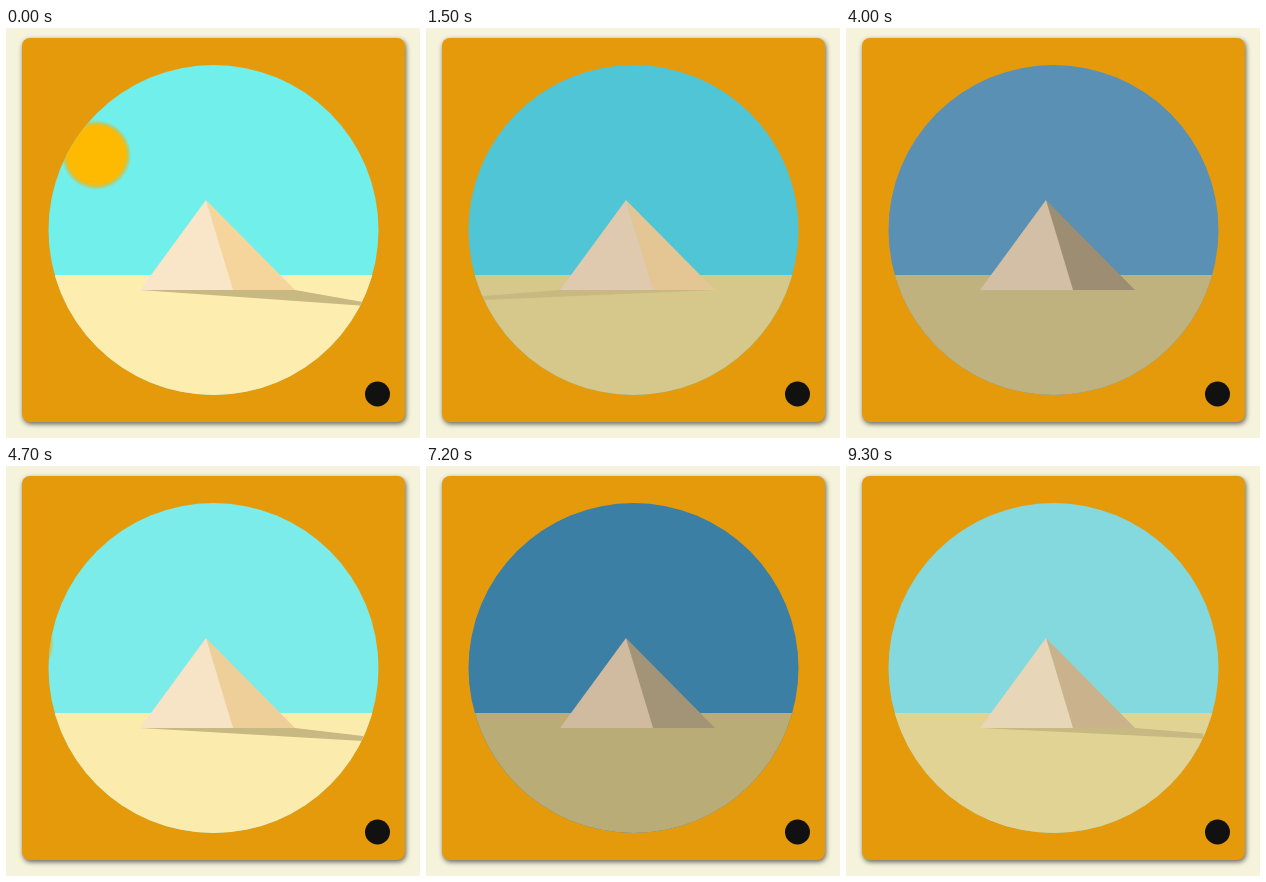
An HTML page that plays this animation: 414 px wide and 410 px high, repeating every 9.4 s.

```html
<!DOCTYPE html>
<html lang="en">
<head>
<meta charset="utf-8">
<title>Desert day and night</title>
<style>
  html, body { margin: 0; width: 100%; height: 100%; overflow: hidden; background: #f5f3dc; }
  .card {
    position: absolute; left: 16px; top: 10px; width: 383px; height: 384px;
    border-radius: 8px; background: #e59a0b; box-shadow: 1px 2px 5px rgba(0, 0, 0, .6);
  }
  svg { position: absolute; left: 0; top: 0; display: block; }
</style>
</head>
<body>
<div class="card"></div>
<svg width="414" height="410" viewBox="0 0 414 410">
  <defs>
    <clipPath id="porthole"><circle cx="207.5" cy="202" r="165"/></clipPath>
    <clipPath id="floor"><rect x="57" y="262" width="300" height="18"/></clipPath>
    <radialGradient id="sunGlow">
      <stop offset=".83" stop-color="#fdba00"/>
      <stop offset=".9" stop-color="#e8b61c" stop-opacity=".7"/>
      <stop offset="1" stop-color="#e0b030" stop-opacity="0"/>
    </radialGradient>
    <radialGradient id="starGlow">
      <stop offset="0" stop-color="#fff000"/>
      <stop offset=".25" stop-color="#e6d416" stop-opacity=".85"/>
      <stop offset=".6" stop-color="#c8ba20" stop-opacity=".4"/>
      <stop offset="1" stop-color="#c8ba20" stop-opacity="0"/>
    </radialGradient>
  </defs>
  <g clip-path="url(#porthole)">
    <rect id="sky" x="42" y="36" width="332" height="332"/>
    <circle id="sun" cx="200" cy="104" r="35" fill="url(#sunGlow)"/>
    <g id="moon">
      <path d="M268 87A28 28 0 1 0 291 137A27.7 27.7 0 0 1 268 87Z" fill="#fff000"/>
      <circle cx="283" cy="98" r="11" fill="url(#starGlow)"/>
      <circle cx="300" cy="119" r="11" fill="url(#starGlow)"/>
    </g>
    <rect id="sand" x="42" y="247" width="332" height="121"/>
    <g clip-path="url(#floor)"><path id="shadow" fill="#c8b982"/></g>
    <path id="right" d="M200 172L289 262H226Z"/>
    <path id="left" d="M200 172L227 262H134Z"/>
  </g>
  <circle cx="371.5" cy="366" r="12.5" fill="#111"/>
</svg>
<script>
  const LOOP = 9400, DAY = 5000, STEP = 100;
  const $ = id => document.getElementById(id);

  // phase in ms: sky, sand, left face, right face
  const tints = [
    [0, '70efeb', 'fdeeb0', 'f9e5c8', 'f5d59c'],
    [800, '5aeeea', 'efe0a2', 'f1e0c3', 'f5d59c'],
    [1500, '4fc5d5', 'd6c78b', 'dfcab0', 'e3c694'],
    [2200, '3b7fa5', 'b9ac76', 'd0bba0', 'a39478'],
    [3300, '283b7c', '968b5b', 'b2a48b', '695f5c'],
    [3700, '2e4683', '9c9160', 'b8aa90', '706663'],
    [4000, '5a90b4', 'c0b27f', 'd3bfa6', '9d8d72'],
    [4300, '84d9de', 'e0d394', 'e7d7b8', 'c9b28c'],
    [4600, '7eebe8', 'faebad', 'f6e2c4', 'eccd98'],
    [5000, '70efeb', 'fdeeb0', 'f9e5c8', 'f5d59c']
  ];
  // ms relative to morning: degrees along the arc, shadow tip x, shadow height
  const arc = [[-1000, -75], [-700, -60], [-300, -43], [0, -23.6], [800, 0], [1200, 15], [1500, 50], [1800, 75]];
  const tip = [[-1000, 550], [-700, 510], [0, 390], [800, 192], [1500, -60], [1800, -170]];
  const height = [[-1000, 0], [-700, 18], [0, 18], [800, 15.5], [1500, 15], [1800, 0]];

  const mix = (a, b, k) => a + (b - a) * k;

  function locate(keys, t) {
    let i = 1;
    while (i < keys.length - 1 && t > keys[i][0]) i++;
    const [a, b] = [keys[i - 1], keys[i]];
    const k = (t - a[0]) / (b[0] - a[0]);
    return [a, b, Math.min(1, Math.max(0, k))];
  }

  function value(keys, t) {
    const [a, b, k] = locate(keys, t);
    return mix(a[1], b[1], k);
  }

  function blend(a, b, k) {
    const part = (hex, i) => parseInt(hex.substr(i, 2), 16);
    return `rgb(${[0, 2, 4].map(i => Math.round(mix(part(a, i), part(b, i), k)))})`;
  }

  // wraps a phase so the time before sunrise becomes negative
  const wrap = t => (t + 1500 + DAY) % DAY - 1500;

  const turn = (id, deg) => $(id).setAttribute('transform', `rotate(${deg} 200 378)`);

  function draw(ms) {
    const phase = Math.floor(ms % LOOP / STEP) * STEP % DAY;
    const [a, b, k] = locate(tints, phase);
    ['sky', 'sand', 'left', 'right'].forEach((id, i) =>
      $(id).setAttribute('fill', blend(a[i + 1], b[i + 1], k)));

    const day = wrap(phase), night = wrap(phase - DAY / 2);
    turn('sun', value(arc, day));
    turn('moon', value(arc, night) - 15);
    $('shadow').setAttribute('d', `M134 262H289L${value(tip, day)} ${262 + value(height, day)}Z`);
  }

  let start;
  function tick(now) {
    start ??= now;
    draw(now - start);
    requestAnimationFrame(tick);
  }
  draw(0);
  requestAnimationFrame(tick);
</script>
</body>
</html>
```
